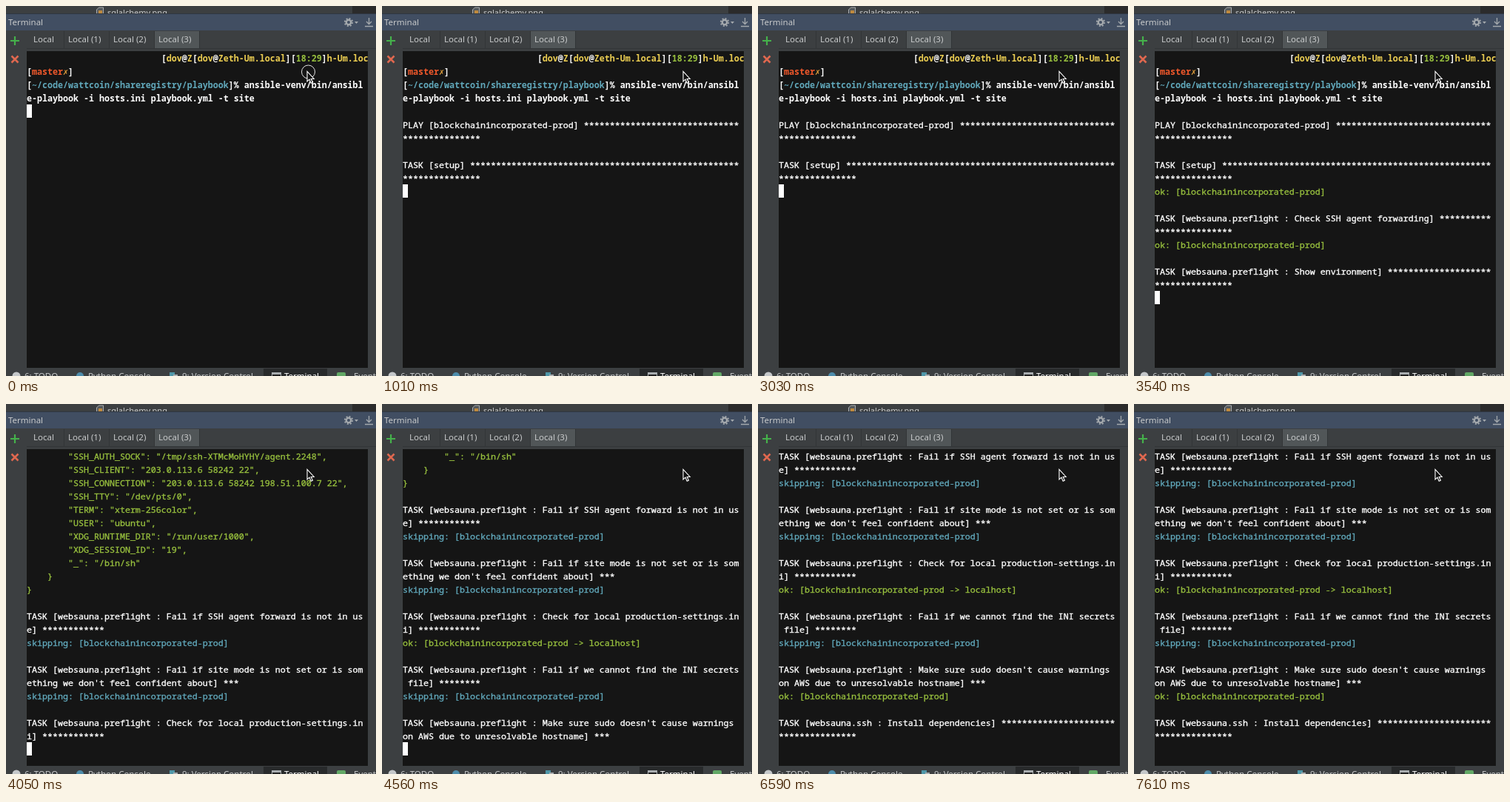
An HTML page for the animation above (8000 ms loop, 500 by 500 pixels).

```html
<!DOCTYPE html>
<html lang="en">
<head>
<meta charset="utf-8">
<title>Terminal session</title>
<style>
html, body { margin: 0; width: 100%; height: 100%; overflow: hidden; background: #3c3f41; }
svg { display: block; width: 500px; height: 500px; }
.ui { font: 11.5px "Noto Sans", "Open Sans", sans-serif; fill: #c8cacb; }
#rows {
  font: 11.667px "Noto Sans Mono", "DejaVu Sans Mono", monospace;
  color: #fff; fill: currentColor; stroke: currentColor; stroke-width: .35;
}
#rows text { white-space: pre; }
.bold { font-weight: 700; stroke-width: 0; }
</style>
</head>
<body>
<svg viewBox="0 0 500 500">
  <rect width="500" height="500" fill="#3c3f41"/>

  <!-- file list above -->
  <rect x="468" width="32" height="10" fill="#2b2b2b"/>
  <path d="M122.500 10V5l3-3h6v8" fill="#55595b" stroke="#a9adb0"/>
  <path d="M125 6h5v4h-5z" fill="#c08a3e"/>
  <text class="ui" x="137" y="13" style="font-size:11px">sqlalchemy.png</text>

  <!-- panel header -->
  <rect y="10" width="500" height="23" fill="#414e62"/>
  <path d="M0 10.500H500" stroke="#2f3742"/>
  <text class="ui" x="3" y="26">Terminal</text>
  <g fill="none" stroke="#a4a9ad">
    <circle cx="463" cy="22" r="3.2" stroke-width="2.4"/>
    <circle cx="463" cy="22" r="5.2" stroke-width="1.8" stroke-dasharray="2 2.08"/>
    <path d="M490.500 16v8M487 21l3.500 3.500L494 21M485 27.500h11" stroke-width="1.3"/>
  </g>
  <path d="M471 21h5l-2.500 3z" fill="#a4a9ad"/>

  <!-- tabs -->
  <rect x="201" y="34" width="60" height="23" fill="#515658"/>
  <path d="M78.500 34v23M139.500 34v23M200.500 34v23M261.500 34v23M28 57.500H500" stroke="#323537"/>
  <g class="ui">
    <text x="37" y="49">Local</text>
    <text x="84" y="49">Local (1)</text>
    <text x="145" y="49">Local (2)</text>
    <text x="206" y="49">Local (3)</text>
  </g>
  <path d="M12 41v12M6 47h12" stroke="#45b14b" stroke-width="2.200"/>
  <path d="M7.500 67.500l9 9M16.500 67.500l-9 9" stroke="#e0684f" stroke-width="2.500"/>

  <!-- terminal -->
  <rect x="28" y="61" width="461" height="428" fill="#151515"/>
  <clipPath id="screen"><path d="M28 61H489V489H28z"/></clipPath>
  <g clip-path="url(#screen)">
    <g id="rows"></g>
    <rect id="caret" x="28" width="7" height="18" fill="#fff"/>
  </g>

  <!-- tool buttons below -->
  <rect x="348" y="490" width="86" height="10" fill="#282a2b"/>
  <circle cx="14" cy="500" r="5.500" fill="#c4c7c9"/>
  <circle cx="100" cy="500" r="5" fill="#4d8cab"/>
  <path d="M221 495h7v5h-7z" fill="#4f97a8"/>
  <path d="M226 498h6v2h-6z" fill="#a9adb0"/>
  <path d="M359.500 495.500h12v6h-12z" fill="#222" stroke="#a9adb0"/>
  <path d="M359 495h13v3h-13z" fill="#a9adb0"/>
  <rect x="447" y="495" width="12" height="9" rx="2" fill="#62a866"/>
  <g class="ui">
    <text x="25" y="504">6: TODO</text>
    <text x="111" y="504">Python Console</text>
    <text x="238" y="504">9: Version Control</text>
    <text x="376" y="504" fill="#fff">Terminal</text>
    <text x="470" y="504">Event Log</text>
  </g>

  <!-- pointer -->
  <circle id="click" cx="408.500" cy="89" r="9" fill="none" stroke="#e4e4e4"/>
  <path d="M407 88.500v13.500l3-2.800 2.200 5 2.200-1-2.200-4.700h4z" fill="#111" stroke="#fff" stroke-width="1.100"/>
</svg>
<script>
const COLS = 65, VISIBLE = 22, ROW = 18, TOP = 61;
const YELLOW = '#ecce52', GREEN = '#97bf3e', TEAL = '#61a8bb';
const HOST = '[blockchainincorporated-prod]';
const $ = id => document.getElementById(id);

const tint = (color, text) => `<tspan color="${color}">${text}</tspan>`;
const bold = text => `<tspan class="bold">${text}</tspan>`;

// Headings are padded with stars to 80 columns, at least three, then wrapped.
function heading(text) {
  const line = (text + ' ').padEnd(Math.max(80, text.length + 4), '*');
  return ['', line.slice(0, COLS), line.slice(COLS)];
}
const task = name => heading(`TASK [${name}]`);
const preflight = name => task('websauna.preflight : ' + name);
const ok = (host = HOST) => tint(GREEN, 'ok: ' + host);
const skip = tint(TEAL, 'skipping: ' + HOST);

const prompt = [
  ' '.repeat(26) + '[' + tint(YELLOW, 'dov') + '@' + tint(YELLOW, 'Z') +
    '[' + tint(YELLOW, 'dov') + '@' + tint(YELLOW, 'Zeth-Um.local') +
    '][' + tint(GREEN, '18:29') + ']' + tint(YELLOW, 'h-Um.local'),
  '[' + tint('#f0582b', 'master') + tint('#e6a23c', '✗') + ']',
  '[' + tint(TEAL, '~/code/wattcoin/shareregistry/playbook') + ']% ansible-venv/bin/ansibl',
  'e-playbook -i hosts.ini playbook.yml -t site'
].map(bold);

const env = [
  '        "SSH_AUTH_SOCK": "/tmp/ssh-XTMcMoHYHY/agent.2248",',
  '        "SSH_CLIENT": "203.0.113.6 58242 22",',
  '        "SSH_CONNECTION": "203.0.113.6 58242 198.51.100.7 22",',
  '        "SSH_TTY": "/dev/pts/0",',
  '        "TERM": "xterm-256color",',
  '        "USER": "ubuntu",',
  '        "XDG_RUNTIME_DIR": "/run/user/1000",',
  '        "XDG_SESSION_ID": "19",',
  '        "_": "/bin/sh"',
  '    }',
  '}'
].map(line => tint(GREEN, line));

// Output arrives in bursts: [time, lines]
const bursts = [
  [0, prompt],
  [500, heading('PLAY ' + HOST)],
  [1010, task('setup')],
  [3540, [ok(), ...preflight('Check SSH agent forwarding'), ok(), ...preflight('Show environment')]],
  [4050, [...env,
    ...preflight('Fail if SSH agent forward is not in use'), skip,
    ...preflight("Fail if site mode is not set or is something we don't feel confident about"), skip,
    ...preflight('Check for local production-settings.ini')]],
  [4560, [ok('[blockchainincorporated-prod -> localhost]'),
    ...preflight('Fail if we cannot find the INI secrets file'), skip,
    ...preflight("Make sure sudo doesn't cause warnings on AWS due to unresolvable hostname")]],
  [5570, [ok(), ...task('websauna.ssh : Install dependencies')]]
];
const caretOff = [[1510, 2020], [2530, 3030], [6590, 7100], [7610, 8000]];

let shown = 0;
function draw(now) {
  const t = now % 8000;
  const arrived = bursts.filter(([start]) => t >= start);
  if (arrived.length !== shown) {
    shown = arrived.length;
    const lines = arrived.flatMap(([, text]) => text).slice(-VISIBLE);
    $('rows').innerHTML = lines.map((line, i) =>
      `<text x="28" y="${TOP + 14 + i * ROW}">${line}</text>`).join('');
    $('caret').setAttribute('y', TOP + lines.length * ROW);
  }
  const hidden = caretOff.some(([from, to]) => t >= from && t < to);
  $('caret').style.opacity = hidden ? 0 : 1;
  $('click').style.opacity = t < 500 ? 1 : 0;
}

const began = performance.now();
function tick() {
  draw(performance.now() - began);
  requestAnimationFrame(tick);
}
tick();
</script>
</body>
</html>
```
